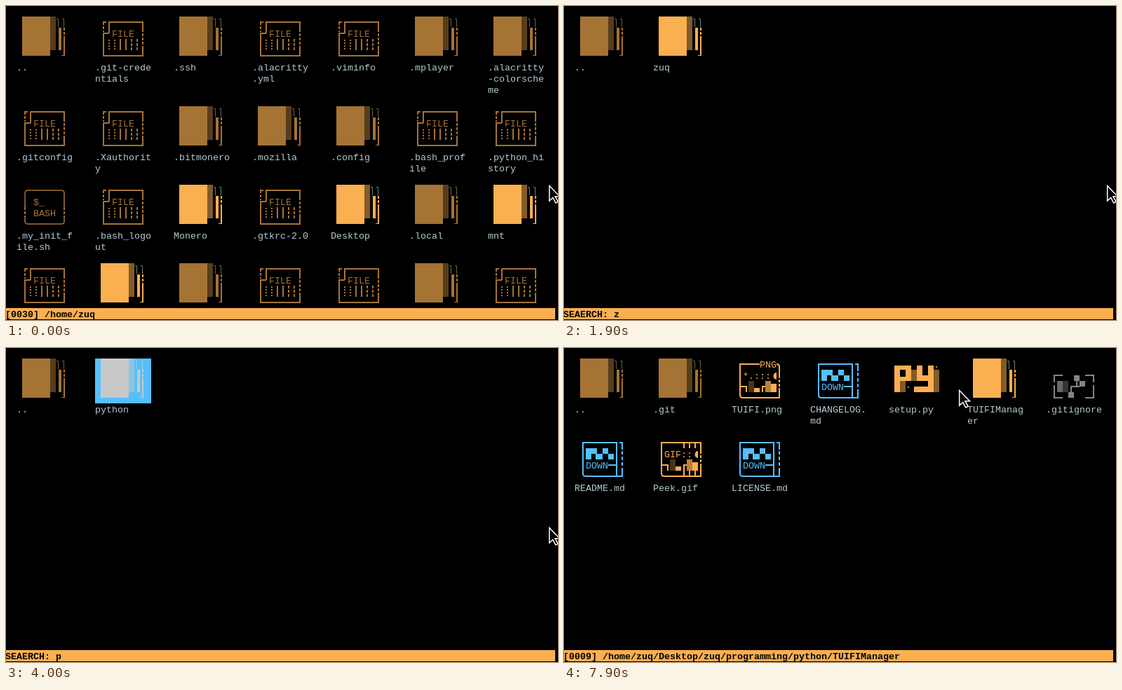
Animation, 787 px wide and 448 px high, one loop 8 s. Source, as an HTML page:

```html
<!DOCTYPE html>
<html lang="en">
<head>
<meta charset="utf-8">
<title>Terminal file manager</title>
<style>
  html, body { margin: 0; width: 100%; height: 100%; overflow: hidden; background: #000; }
  svg { display: block; width: 787px; height: 448px; }
  text { font: 13.333px "Liberation Mono", monospace; white-space: pre; }
  .status { font-weight: bold; }
  .scene { display: none; }
  .scene.on { display: inline; }
</style>
</head>
<body>
<svg id="stage" viewBox="0 0 787 448"></svg>
<script>
const LOOP = 8000;
const CELL_W = 8, CELL_H = 16, PITCH = 112, LEFT = 15, TOP = 15, WRAP = 10;
const ORANGE = '#faaf50', BROWN = '#a57334', DARK = '#573d1c', SHADE = '#825b2a';
const BLUE = '#55bfff', GREY = '#858585', LABEL = '#b3cbd0', SILVER = '#c8c8c8';

// Drawing helpers
const rect = (x, y, w, h, fill) =>
  `<rect x="${x}" y="${y}" width="${w}" height="${h}" fill="${fill}"/>`;
const line = (d, stroke, width = 2, dash = '') =>
  `<path d="${d}" fill="none" stroke="${stroke}" stroke-width="${width}" stroke-dasharray="${dash}"/>`;
const text = (x, y, s, fill, cls = '') =>
  `<text x="${x}" y="${y}" fill="${fill}" class="${cls}">${s}</text>`;
const cellText = (col, row, s, fill) => text(col * CELL_W, row * CELL_H + 13, s, fill);
const group = (x, y, body) => `<g transform="translate(${x} ${y})">${body}</g>`;

function folder(main, shade, tick) {
  return rect(8, 0, 40, 56, main) + rect(48, 0, 8, 48, shade) +
    line('M57 3.5h2.5v11.5M65 3.5h2.5v11.5', tick, 1) +
    rect(60, 16, 4, 32, main) +
    line('M68 16v16', main, 2, '4 2') +
    line('M68 28v27.5', main) + line('M64 55.5h5', main, 1);
}

function file() {
  return line('M16 8h-4v4M20 24V8h48v14M20 24h-8v32h56v-14', BROWN) +
    line('M12 14v8M68 24v18', BROWN, 2, '4 2') +
    line('M20 33v14M28 33v14', BROWN, 2, '2 2') +
    line('M36 32v16M44 32v16', BROWN) +
    line('M52 32v16M60 32v16', BROWN, 2, '4 2') +
    cellText(3, 1, 'FILE', BROWN);
}

function bash() {
  return line('M12 32V12q0-4 4-4h48q4 0 4 4v20', BROWN, 1.5) +
    line('M12 32v14M68 32v14', BROWN, 2, '4 2') +
    line('M12 46v6q0 4 4 4h48q4 0 4-4v-6', BROWN, 1.5) +
    cellText(3, 1, '$_', BROWN) + cellText(3, 2, 'BASH', BROWN);
}

// Small landscape shared by the picture icons
function scenery() {
  return line('M12 40h9v8', ORANGE) + rect(24, 32, 8, 16, '#4a3418') +
    rect(32, 42, 8, 6, ORANGE) + line('M44 48v-8h4', ORANGE) +
    rect(48, 32, 8, 16, '#b9813b') + rect(56, 36, 8, 12, ORANGE) +
    `<path d="M64 20a4.5 5 0 0 0 0 10z" fill="${ORANGE}"/>`;
}

function png() {
  return line('M40 8H12v44q0 4 4 4h52v-14M64 8q4 0 4 4v12', ORANGE) +
    line('M68 24v18', ORANGE, 2, '4 2') +
    cellText(5, 0, 'PNG', ORANGE) + cellText(2, 1, '*.:::', ORANGE) + scenery();
}

function gif() {
  return line('M12 8v44q0 4 4 4h52V8zM44 8v8M52 8v8M60 8v8M44 48v8M52 48v8M60 48v8', ORANGE) +
    line('M68 24v18', '#000', 2, '2 4') +
    cellText(2, 1, 'GIF::', ORANGE) + scenery();
}

function markdown() {
  return line('M60 56V8H12v44q0 4 4 4h52v-8M64 8h4v10M48 40h12', BLUE) +
    line('M68 20v28', BLUE, 2, '5 3') +
    rect(16, 16, 16, 8, BLUE) + rect(40, 16, 8, 8, BLUE) +
    rect(16, 24, 8, 8, BLUE) + rect(30, 24, 10, 8, BLUE) + rect(48, 24, 8, 8, BLUE) +
    cellText(2, 2, 'DOWN', BLUE);
}

function python() {
  const block = (x, y, w, h) => rect(x, y, w, h, ORANGE);
  return rect(16, 32, 8, 16, SHADE) + rect(32, 16, 8, 16, SHADE) + rect(64, 16, 8, 32, SHADE) +
    block(8, 10, 8, 38) + block(16, 10, 16, 6) + block(24, 16, 8, 10) + block(16, 26, 16, 6) +
    block(40, 10, 8, 22) + block(48, 24, 8, 8) + block(56, 10, 8, 38) + block(36, 40, 20, 8) +
    rect(27, 40, 2, 2, '#8ba56f') + rect(67, 11, 2, 2, '#8ba56f');
}

function ignore() {
  return line('M24 24H12v10M12 38v18h12M56 24h12v10M68 38v18h-12', GREY) +
    rect(16, 32, 8, 16, '#686868') + rect(24, 32, 8, 16, '#353535') +
    rect(40, 24, 8, 8, GREY) + rect(48, 32, 8, 8, GREY) + rect(32, 48, 8, 8, GREY) +
    line('M44 32v8M36 48v-8h12', GREY);
}

const ICONS = {
  D: () => folder(ORANGE, SHADE, '#63857a'),
  d: () => folder(BROWN, DARK, '#67634b'),
  s: () => rect(0, 0, 80, 64, BLUE) + folder(SILVER, '#8fc4e3', '#a5cbe0'),
  f: file, b: bash, p: png, g: gif, m: markdown, y: python, i: ignore
};

// Items are written as icon:name; an upper-case D is a visible folder
const HOME = `d:.. f:.git-credentials d:.ssh f:.alacritty.yml f:.viminfo d:.mplayer d:.alacritty-colorscheme
  f:.gitconfig f:.Xauthority d:.bitmonero d:.mozilla d:.config f:.bash_profile f:.python_history
  b:.my_init_file.sh f:.bash_logout D:Monero f:.gtkrc-2.0 D:Desktop d:.local D:mnt
  f: D: d: f: f: d: f:`;
const PROJECT = `d:.. d:.git p:TUIFI.png m:CHANGELOG.md y:setup.py D:TUIFIManager i:.gitignore
  m:README.md g:Peek.gif m:LICENSE.md`;
const PATH = '/home/zuq';

// start, status line, items
const SCENES = [
  [0, `[0030] ${PATH}`, HOME],
  [400, 'SEAERCH: d', 'd:.. D:Desktop D:Downloads'],
  [500, 'SEAERCH: d', 'd:.. s:Desktop D:Downloads'],
  [700, 'SEAERCH: de', 'd:.. s:Desktop'],
  [1200, `[0003] ${PATH}/Desktop`, 'd:.. D:zuq D:untappdscr D:test'],
  [1900, 'SEAERCH: z', 'd:.. D:zuq'],
  [2000, 'SEAERCH: z', 'd:.. s:zuq'],
  [2200, `[0005] ${PATH}/Desktop/zuq`, 'd:.. D:programming D:multimedia D:trash D:notes D:tools'],
  [3500, 'SEAERCH: p', 'd:.. s:programming'],
  [3700, `[0002] ${PATH}/Desktop/zuq/programming`, 'd:.. D:python D:javascript'],
  [3900, 'SEAERCH: p', 'd:.. D:python'],
  [4000, 'SEAERCH: p', 'd:.. s:python'],
  [4500, `[0004] ${PATH}/Desktop/zuq/programming/python`, 'd:.. D:TUIFIManager D:SCTG D:trash D:random'],
  [5900, 'SEAERCH: t', 'd:.. s:TUIFIManager D:trash'],
  [6100, `[0009] ${PATH}/Desktop/zuq/programming/python/TUIFIManager`, PROJECT]
];

// start, shape, x, y
const POINTER = [
  [0, 'arrow', 774, 255], [100, 'beam', 775, 258], [400, 'arrow', 774, 255],
  [5600, 'beam', 775, 258], [5900, 'arrow', 774, 255],
  [7400, 'arrow', 640, 206], [7500, 'arrow', 501, 158],
  [7700, 'arrow', 516, 131], [7800, 'arrow', 545, 86], [7900, 'arrow', 563, 59]
];

function grid(list) {
  const items = list.trim().split(/\s+/).map(s => s.split(':'));
  let out = '', y = TOP;
  for (let i = 0; i < items.length; i += 7) {
    let lines = 1;
    items.slice(i, i + 7).forEach(([icon, name], col) => {
      const x = LEFT + col * PITCH;
      const parts = name.match(new RegExp(`.{1,${WRAP}}`, 'g')) || [];
      lines = Math.max(lines, parts.length);
      out += group(x, y, ICONS[icon]());
      parts.forEach((part, n) => { out += text(x, y + 77 + n * CELL_H, part, LABEL); });
    });
    y += 80 + lines * CELL_H;
  }
  return out;
}

const scene = ([, status, list]) =>
  `<g class="scene">${grid(list)}${rect(0, 431, 783, 16, ORANGE)}${text(-1, 444, status, '#000', 'status')}</g>`;

const stage = document.getElementById('stage');
stage.innerHTML = rect(0, 0, 787, 448, '#000') + SCENES.map(scene).join('') +
  `<g id="arrow"><path d="M.7 1.5V23l5-4.5 4 7.5 3.3-1.7-4-7.5h6.5z" fill="#000" stroke="#fff" stroke-width="1.5"/></g>
   <g id="beam"><path d="M-4.3-11.3h8.6v3.6H1.8V7.7h2.5v3.6h-8.6V7.7h2.5V-7.7h-2.5z" fill="#000" stroke="#fff" stroke-width="1.4"/></g>`;

const groups = [...stage.querySelectorAll('.scene')];
const shapes = { arrow: document.getElementById('arrow'), beam: document.getElementById('beam') };
const stepAt = (table, t) => table.findLastIndex(step => step[0] <= t);

function render(t) {
  const current = stepAt(SCENES, t);
  groups.forEach((g, i) => g.classList.toggle('on', i === current));
  const [, shape, x, y] = POINTER[stepAt(POINTER, t)];
  for (const name in shapes) shapes[name].style.display = name === shape ? '' : 'none';
  shapes[shape].setAttribute('transform', `translate(${x} ${y})`);
}

const begin = performance.now();
function tick() {
  render((performance.now() - begin) % LOOP);
  requestAnimationFrame(tick);
}
tick();
</script>
</body>
</html>
```
